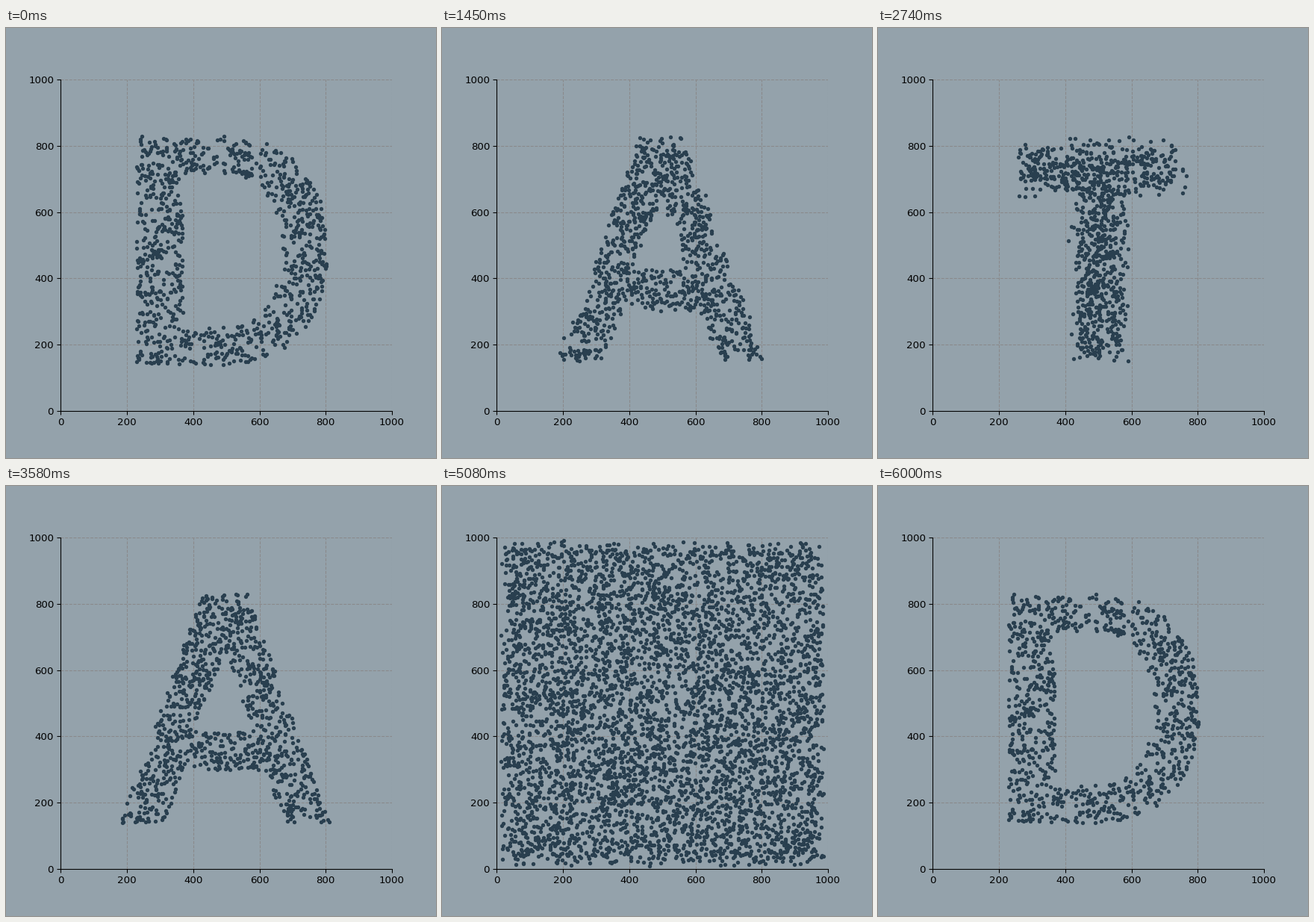
A matplotlib script for the animation above (6240 ms loop, 576 by 576 pixels).

```python
import numpy as np
import matplotlib.pyplot as plt
from matplotlib.animation import FuncAnimation

LOOP, TICK = 6240, 20          # ms
FIRST, PERIOD = 240, 1210      # start of the first morph, distance between morphs
STEPS, STEP = 24, 40
LOW, HIGH = 139, 831           # baseline and cap height
MID = (LOW + HIGH) / 2
BACK, INK, GRID = "#94a2ab", "#293f4f", "#8a898b"

rng = np.random.default_rng(12)


def bowl(x, y, left, width, height):
    """Flat left side, superellipse on the right."""
    u = np.maximum(x - MID, 0) / width
    v = abs(y - MID) / height
    return (x > left) & (u ** 2.3 + v ** 2.3 < 1)


def in_d(x, y):
    return bowl(x, y, 229, 319, MID - LOW) & ~bowl(x, y, 368, 179, 233)


def in_a(x, y):
    d = abs(x - 495)
    outside = d < 68 + 0.36 * (HIGH - y)
    gap = d < 0.335 * (668 - y)
    bar = (y > 297) & (y < 413)
    return outside & (~gap | bar)


def in_t(x, y):
    d = abs(x - 504)
    return (d < 69) | (d < 269) & (y > 714)


def fill(inside, n=1000):
    """Scatter n random points inside a letter."""
    x = rng.uniform(0, 1000, n * 12)
    y = rng.uniform(LOW, HIGH, n * 12)
    return np.column_stack((x, y))[inside(x, y)][:n]


D, A, T = map(fill, (in_d, in_a, in_t))
SQUARE = rng.uniform(0, 1000, (5000, 2))
shapes = [D, A, T, A, SQUARE, D]


def cloud(ms):
    if ms < FIRST:
        return shapes[0]
    i = min((ms - FIRST) // PERIOD, len(shapes) - 2)
    k = (ms - FIRST - i * PERIOD) // STEP + 1
    a, b = shapes[i], shapes[i + 1]
    if k >= STEPS:
        return b
    n = max(len(a), len(b))
    f = k / STEPS
    return np.resize(a, (n, 2)) * (1 - f) + np.resize(b, (n, 2)) * f


fig, ax = plt.subplots(figsize=(6, 6), dpi=96, facecolor=BACK)
ax.set_facecolor(BACK)
ax.set(xlim=(0, 1000), ylim=(0, 1000), aspect="equal")
ax.spines[["top", "right"]].set_visible(False)
ax.grid(color=GRID, linestyle="--", linewidth=0.8)
dots, = ax.plot([], [], ".", color=INK, markersize=6)


def draw(n):
    # the half tick rounds morph starts to the nearest drawn moment
    dots.set_data(*cloud(n * TICK + TICK // 2).T)
    return dots,


anim = FuncAnimation(fig, draw, frames=LOOP // TICK, interval=TICK,
                     repeat=True, repeat_delay=0)
plt.show()
```
